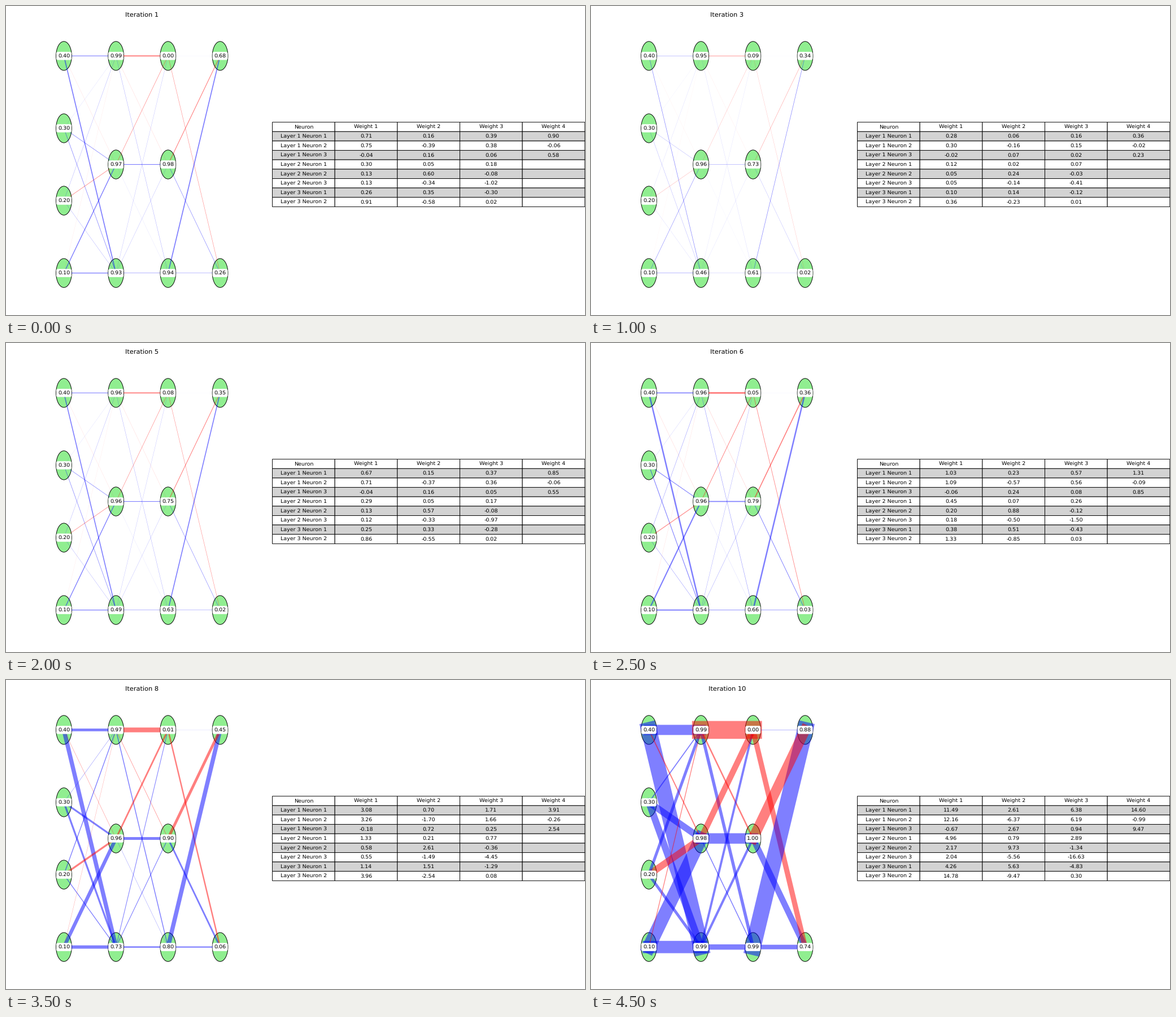
A matplotlib script that plays this animation: 1025 by 547 pixels, repeating every 5000 ms.

```python
import matplotlib.pyplot as plt
import numpy as np
from matplotlib.animation import FuncAnimation
from matplotlib.patches import Ellipse

W, H, DPI = 1025, 547, 64
PT = W / 15 / DPI               # one layout point in figure points

INPUTS = np.array([0.1, 0.2, 0.3, 0.4])
SIZES = [4, 3, 3, 2]
COLUMNS = 5

# Common gain of all weights: start value, then one per iteration
GAINS = [2, 0.4, 0.16, 0.16, 0.2286, 0.381, 0.586, 0.955, 1.7442, 3.3218, 6.5135]
FRAMES = len(GAINS) - 1

plt.rcParams.update({
    "font.family": "DejaVu Sans",
    "font.size": 10 * PT,
    "axes.titlepad": 6 * PT,
    "patch.linewidth": PT,
    "text.hinting": "none",
})

rng = np.random.RandomState(0)
weights = [rng.randn(n_out, n_in) for n_in, n_out in zip(SIZES, SIZES[1:])]
biases = [2 * rng.randn(n_out) for n_out in SIZES[1:]]

fig, (net, side) = plt.subplots(1, 2, figsize=(W / DPI, H / DPI), dpi=DPI)
net.set(xlim=(0, 1), ylim=(0, 1), autoscale_on=False)
net.axis("off")
side.axis("off")


def forward(gain):
    """Activations of all neurons, layer by layer."""
    layers = [INPUTS]
    for w, b in zip(weights, biases):
        layers.append(1 / (1 + np.exp(-(gain * w @ layers[-1] + b))))
    return np.concatenate(layers)


def node_pos(layer, k):
    """Centre of a neuron; index 0 is at the bottom."""
    return (layer + 1) / 5, 0.125 + 0.75 * k / (SIZES[layer] - 1)


def build_nodes():
    labels = []
    box = dict(boxstyle="round,pad=0.3", facecolor="white", edgecolor="none")
    for layer, size in enumerate(SIZES):
        for k in range(size):
            pos = node_pos(layer, k)
            net.add_patch(Ellipse(pos, 0.06, 0.1, facecolor="lightgreen",
                                  edgecolor="black", zorder=1))
            labels.append(net.text(*pos, "", ha="center", va="center",
                                   bbox=box, zorder=3))
    return labels


def build_links():
    links = []
    for layer, matrix in enumerate(weights):
        for (k, i), w in np.ndenumerate(matrix):
            ends = zip(node_pos(layer, i), node_pos(layer + 1, k))
            line, = net.plot(*ends, color="blue" if w > 0 else "red",
                             alpha=0.5, zorder=2, snap=False)
            links.append((line, w))
    return links


def build_table():
    names = [f"Layer {layer} Neuron {k}"
             for layer, size in enumerate(SIZES[1:], 1)
             for k in range(1, size + 1)]
    heads = ["Neuron"] + [f"Weight {i}" for i in range(1, COLUMNS)]
    table = side.table(cellText=[[name] + [""] * (COLUMNS - 1) for name in names],
                       colLabels=heads, cellLoc="center", loc="center")
    table.auto_set_font_size(False)
    table.set_fontsize(10 * PT)
    table.scale(1.2, 1.2 * PT)
    for (row, _), cell in table.get_celld().items():
        cell.set_facecolor("lightgray" if row % 2 else "white")
        cell.set_snap(False)

    rows = [row for matrix in weights for row in matrix]
    return [(table[r, c].get_text(), w)
            for r, row in enumerate(rows, 1) for c, w in enumerate(row, 1)]


labels = build_nodes()
links = build_links()
cells = build_table()


def update(n):
    gain = GAINS[n + 1]
    net.set_title(f"Iteration {n + 1}")
    # Activations come from the weights before this iteration's update
    for label, value in zip(labels, forward(GAINS[n])):
        label.set_text(f"{value:.2f}")
    for line, w in links:
        line.set_linewidth(2 * abs(w) * gain * PT)
    for text, w in cells:
        text.set_text(f"{w * gain:.2f}")
    return []


update(0)
fig.tight_layout()
anim = FuncAnimation(fig, update, frames=FRAMES, interval=500,
                     repeat=True, repeat_delay=0, blit=False)
plt.show()
```
